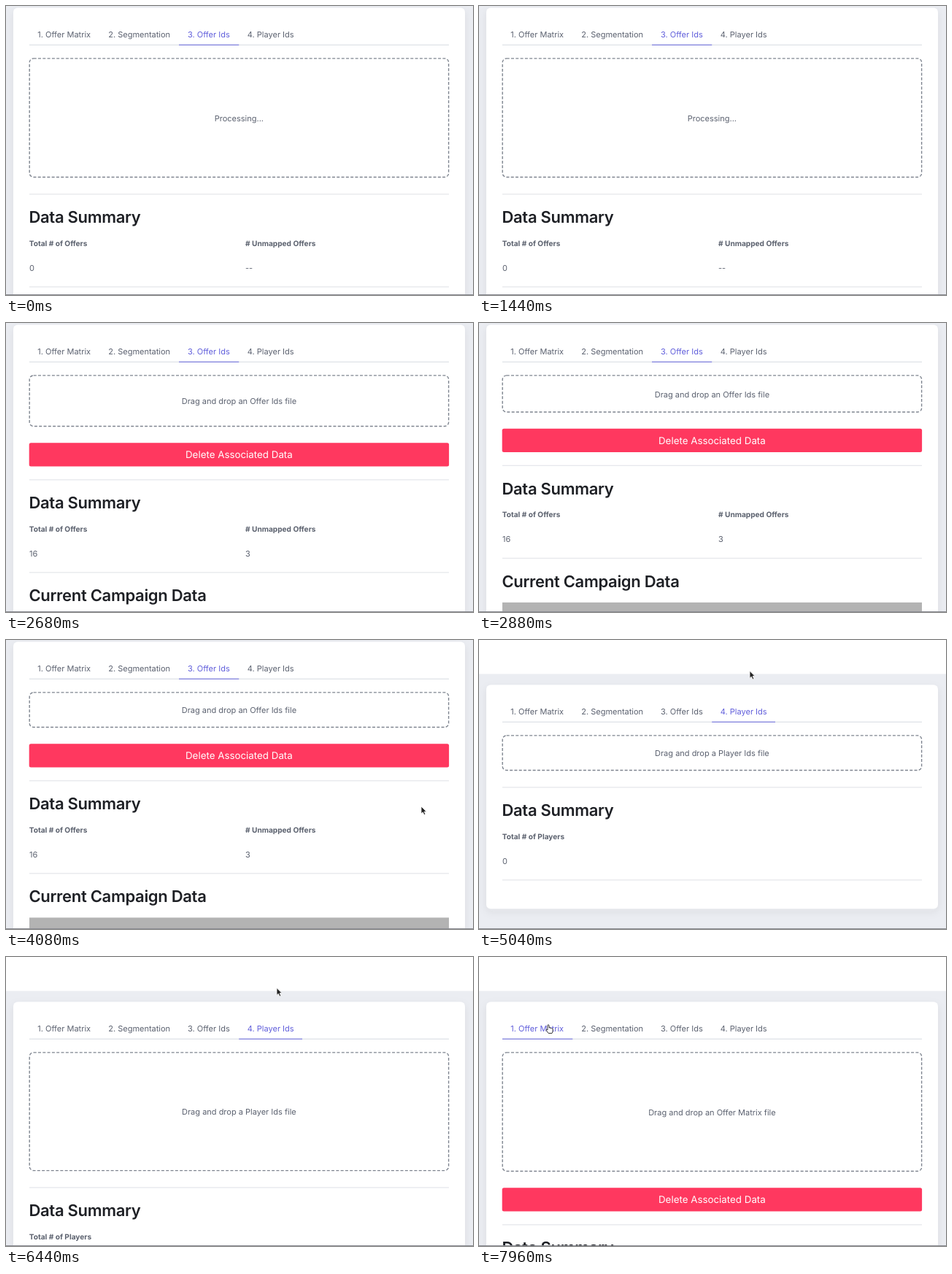
Animation, 640 px wide and 396 px high, one loop 8 s. Source, as an HTML page:

```html
<!DOCTYPE html>
<html lang="en">
<head>
<meta charset="utf-8">
<title>Offer upload tabs</title>
<style>
  html, body { margin: 0; width: 100%; height: 100%; overflow: hidden; background: #fff; }
  svg { display: block; }
  text { font: 400 11px Inter, "Open Sans", sans-serif; fill: #5c6270; white-space: pre; text-rendering: geometricPrecision; }
  .heading { font-size: 22px; font-weight: 600; letter-spacing: -.3px; fill: #1e2025; }
  .label { font-size: 10.15px; font-weight: 700; fill: #5b616e; }
  .button { font-size: 13.35px; fill: #fff; }
  .middle { text-anchor: middle; }
  .rule { fill: #e6e8ec; }
  .active { fill: #605edb; }
</style>
</head>
<body>
<svg width="640" height="396" viewBox="0 0 640 396">
  <defs>
    <filter id="shadow" x="-10%" y="-10%" width="120%" height="125%">
      <feDropShadow dx="0" dy="4" stdDeviation="6" flood-color="#303742" flood-opacity=".07"/>
    </filter>
  </defs>
  <g id="page">
    <rect y="46.5" width="640" height="600" fill="#ebedf2"/>
    <rect id="card" x="10" y="61.5" width="619" rx="6" fill="#fff" filter="url(#shadow)"/>
    <rect x="32" y="111.8" width="575" height="1.1" fill="#dadee4"/>
    <g id="tabs"></g>
    <rect id="underline" class="active" y="111.8" height="1.1" opacity=".85"/>
    <rect id="dropzone" x="32.2" y="130.9" width="574.4" rx="5.5" fill="none"
          stroke="#7f8590" stroke-width="1.4" stroke-dasharray="4 2.3"/>
    <text id="prompt" class="middle" x="319.4"></text>
    <g id="delete">
      <rect x="31.7" y="22" width="575.4" height="32.4" rx="2.5" fill="#ff385f"/>
      <text class="button middle" x="319.4" y="43">Delete Associated Data</text>
    </g>
    <g id="summary">
      <rect class="rule" x="32" y="22" width="575" height="1.3"/>
      <text class="heading" x="31.4" y="62.2">Data Summary</text>
      <text id="totalLabel" class="label" x="31.8" y="93.8"></text>
      <text id="total" x="32" y="127.4"></text>
      <g id="unmappedColumn">
        <text class="label" x="328" y="93.8"># Unmapped Offers</text>
        <text id="unmapped" x="328" y="127.4"></text>
      </g>
      <rect class="rule" x="32" y="149" width="575" height="1.3"/>
      <g id="campaign">
        <text class="heading" x="31.4" y="189.2">Current Campaign Data</text>
        <rect x="32" y="210.2" width="575" height="40" fill="#b3b3b3"/>
      </g>
    </g>
  </g>
  <rect y="395" width="640" height="1" fill="#8b8d93"/>
  <g id="cursor">
    <path id="arrow" d="M0 0V10L2.3 7.9L4 11.6L5.8 10.8L4.2 7.2H7.2Z" fill="#222" stroke="#fff" stroke-width=".8"/>
    <path id="hand" d="M-1 1Q0-.6 1 1L1.2 4.5Q2.2 3.8 3 5Q4.2 4.4 4.8 5.6Q6.3 5.2 6.3 6.8L5.8 10.5L5 12H.2L-3 7.8Q-3.2 6.4-1.8 6.8L-1 7.6Z"
          fill="#fff" stroke="#222" stroke-width=".9" stroke-linejoin="round"/>
  </g>
</svg>
<script>
const LOOP = 8000, LOADED = 2440, TO_PLAYERS = 4640, TO_MATRIX = 7800;
const OPEN = 164, CLOSED = 49, ZONE_TOP = 130.2;

const tabs = [
  { label: "1. Offer Matrix", x: 32, end: 128.3, textX: 43.3, file: "an Offer Matrix" },
  { label: "2. Segmentation", x: 128.3, end: 237, textX: 140.2, file: "a Segmentation" },
  { label: "3. Offer Ids", x: 237, end: 319.2, textX: 249, file: "an Offer Ids" },
  { label: "4. Player Ids", x: 319.2, end: 406, textX: 330.8, file: "a Player Ids" }
];
const cursorStops = [
  [3880, 618, 350], [4080, 569, 228], [4440, 371, 42.4],
  [7000, 371, 42.4], [7600, 95, 92.5], [LOOP, 95, 92.5]
];

const el = id => document.getElementById(id);
const set = (id, attrs) => Object.entries(attrs).forEach(([k, v]) => el(id).setAttribute(k, v));
const show = (id, on) => set(id, { display: on ? "inline" : "none" });
const write = (id, text) => { if (el(id).textContent !== text) el(id).textContent = text; };

const tabTexts = tabs.map(tab => {
  const text = document.createElementNS("http://www.w3.org/2000/svg", "text");
  text.textContent = tab.label;
  text.setAttribute("x", tab.textX);
  text.setAttribute("y", 102);
  return el("tabs").appendChild(text);
});

// Critically damped spring from 0 to 1
function spring(ms, stiffness) {
  const u = Math.max(0, ms) * stiffness;
  return 1 - (1 + u) * Math.exp(-u);
}

function zoneHeight(t) {
  const range = OPEN - CLOSED;
  return t < TO_PLAYERS
    ? OPEN - range * spring(t - 2453, .0134)
    : CLOSED + range * spring(t - 6042, .0173);
}

function cursorAt(t) {
  const i = cursorStops.findIndex(stop => t < stop[0]);
  const [t0, x0, y0] = cursorStops[i - 1], [t1, x1, y1] = cursorStops[i];
  const p = (t - t0) / (t1 - t0), eased = p * p * (3 - 2 * p);
  return [x0 + (x1 - x0) * eased, y0 + (y1 - y0) * eased];
}

function drawCursor(t) {
  const visible = t >= cursorStops[0][0];
  show("cursor", visible);
  if (!visible) return;
  const onTab = (t >= 4400 && t < TO_PLAYERS) || t >= 7520;
  show("hand", onTab);
  show("arrow", !onTab);
  set("cursor", { transform: `translate(${cursorAt(t)})` });
}

function draw(t) {
  const active = t < TO_PLAYERS ? 2 : t < TO_MATRIX ? 3 : 0;
  const tab = tabs[active], players = active === 3;
  const loaded = t >= LOADED, hasData = loaded && !players;
  const height = zoneHeight(t), bottom = ZONE_TOP + height;

  set("page", { transform: `translate(0 ${t < TO_PLAYERS ? -59 : 0})` });
  tabTexts.forEach((text, i) => text.setAttribute("class", i === active ? "active" : ""));
  set("underline", { x: tab.x, width: tab.end - tab.x });
  set("card", { height: players ? bottom + 189 - 61.5 : 560 });

  set("dropzone", { height: height - 1.4 });
  set("prompt", { y: ZONE_TOP + height / 2 + 4.6 });
  write("prompt", loaded ? `Drag and drop ${tab.file} file` : "Processing...");

  show("delete", hasData);
  set("delete", { transform: `translate(0 ${bottom})` });
  set("summary", { transform: `translate(0 ${bottom + (hasData ? 50 : 0)})` });
  write("totalLabel", `Total # of ${players ? "Players" : "Offers"}`);
  write("total", hasData ? "16" : "0");
  write("unmapped", hasData ? "3" : "--");
  show("unmappedColumn", !players);
  show("campaign", hasData);
  drawCursor(t);
}

const start = performance.now();
function tick() {
  draw((performance.now() - start) % LOOP);
  requestAnimationFrame(tick);
}
tick();
</script>
</body>
</html>
```
